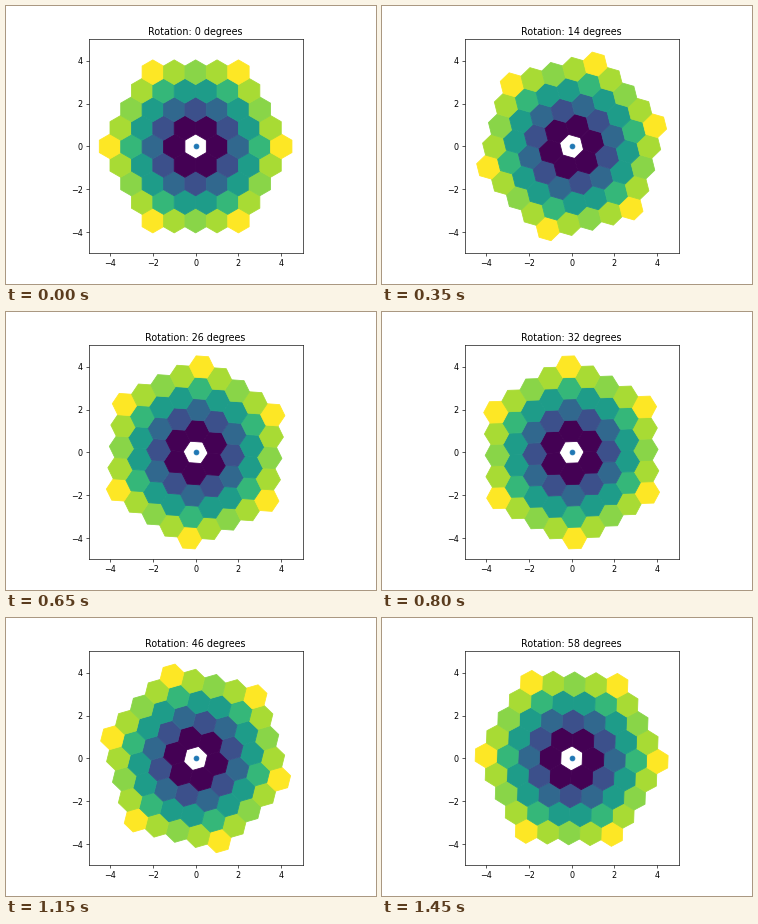
A matplotlib script that plays this animation: 370 px wide and 278 px high, repeating every 1500 ms.

```python
import numpy as np
import matplotlib.pyplot as plt
from matplotlib.animation import FuncAnimation
from matplotlib.collections import PolyCollection

WIDTH, HEIGHT = 370, 278
DPI = WIDTH / 6.4
RINGS = 4
FRAMES, INTERVAL = 30, 50
STEP = 2  # degrees per frame


def hex_centres(rings):
    """Centres of a hexagonal grid with unit spacing, without the middle cell."""
    centres = []
    for r in range(-rings, rings + 1):
        for q in range(-rings, rings + 1):
            if 0 < max(abs(q), abs(r), abs(q + r)) <= rings:
                centres.append((q + r / 2, r * np.sqrt(3) / 2))
    return np.array(centres)


def rotated(points, degrees):
    a = np.radians(degrees)
    turn = np.array([[np.cos(a), np.sin(a)], [-np.sin(a), np.cos(a)]])
    return points @ turn


centres = hex_centres(RINGS)
corner_angles = np.radians(np.arange(6) * 60 + 90)
corners = np.column_stack([np.cos(corner_angles), np.sin(corner_angles)]) / np.sqrt(3)
cells = centres[:, None, :] + corners[None, :, :]

# The tiny margin keeps the pixel size from being rounded down.
fig, ax = plt.subplots(
    figsize=((WIDTH + 1e-6) / DPI, (HEIGHT + 1e-6) / DPI), dpi=DPI
)
ax.set_aspect("equal")
ax.set_xlim(-5, 5)
ax.set_ylim(-5, 5)
ax.set_xticks(range(-4, 5, 2))
ax.set_yticks(range(-4, 5, 2))

grid = PolyCollection(cells, cmap="viridis", edgecolors="face", linewidths=1)
grid.set_array(np.hypot(*centres.T))
grid.set_clim(1, RINGS)
ax.add_collection(grid, autolim=False)
ax.plot(0, 0, "o", color="tab:blue")
title = ax.set_title("")


def update(frame):
    angle = frame * STEP
    grid.set_verts(rotated(cells, angle))
    title.set_text(f"Rotation: {angle} degrees")
    return grid, title


anim = FuncAnimation(
    fig, update, frames=FRAMES, interval=INTERVAL, repeat=True, repeat_delay=0
)
plt.show()
```
